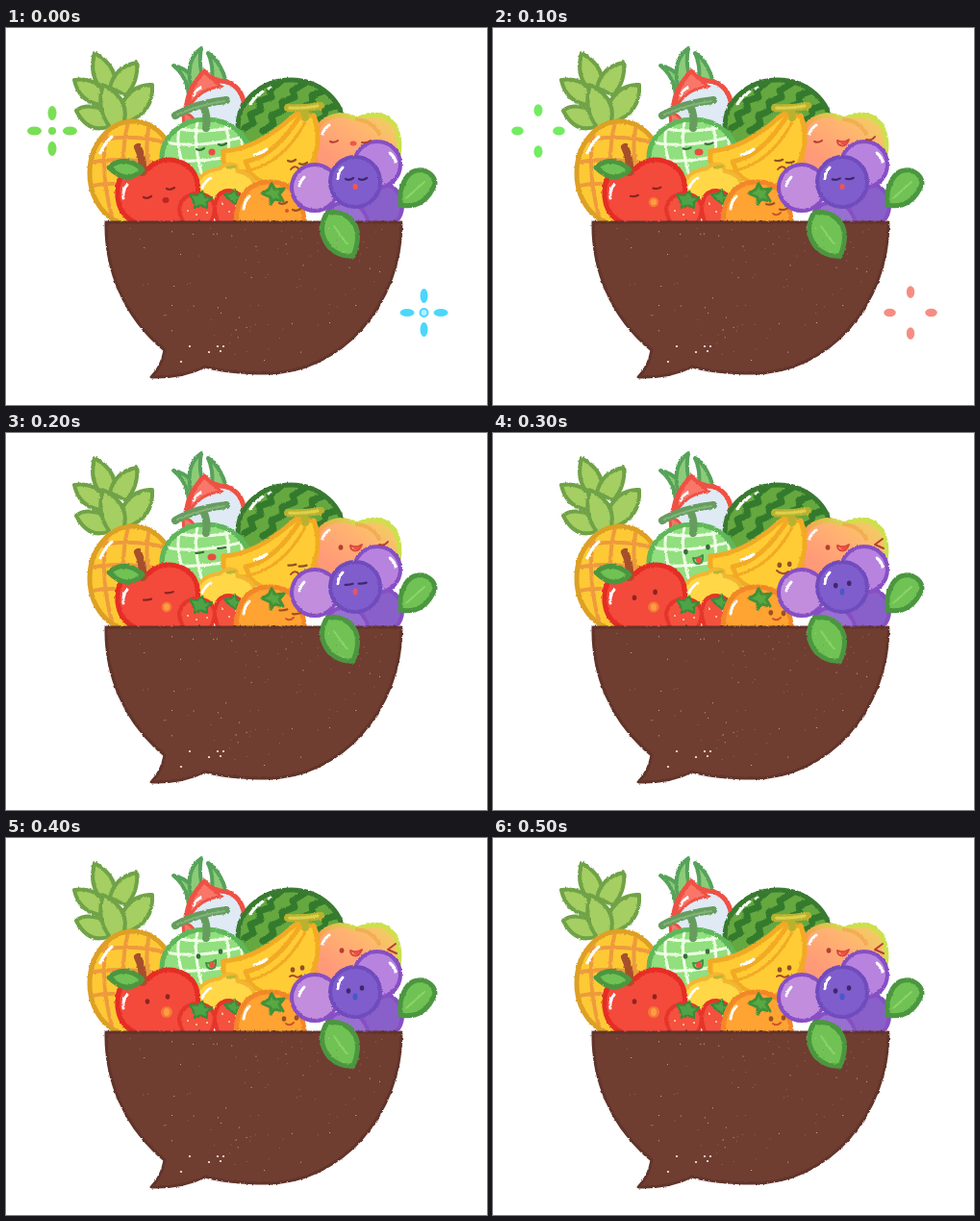
An HTML page that plays this animation: 500 px wide and 392 px high, repeating every 0.6 s.

```html
<!DOCTYPE html>
<html>
<head>
<meta charset="utf-8">
<style>
html, body { margin: 0; width: 100%; height: 100%; overflow: hidden; background: #fff }
svg { display: block; width: 500px; height: 392px }
path, ellipse, circle { stroke-linecap: round; stroke-linejoin: round }
.line { fill: none }
.shine { fill: none; stroke: #fff; stroke-width: 3 }
.crown { fill: #a5cf62; stroke: #70a247; stroke-width: 4 }
.leaf { fill: #70c254; stroke: #4c9640; stroke-width: 5 }
.berry { fill: #f4513f; stroke: #e5352b; stroke-width: 4 }
</style>
</head>
<body>
<svg viewBox="0 0 500 392">
<defs>
  <filter id="rough" x="0" y="0" width="500" height="392" filterUnits="userSpaceOnUse" color-interpolation-filters="sRGB">
    <feTurbulence type="fractalNoise" baseFrequency=".35" numOctaves="2" seed="4"/>
    <feDisplacementMap in="SourceGraphic" scale="2.5" xChannelSelector="R" yChannelSelector="G"/>
  </filter>
  <linearGradient id="skin" x1="0" y1="1" x2="1" y2="0">
    <stop offset=".25" stop-color="#ff9a78"/><stop offset=".65" stop-color="#ffb570"/><stop offset="1" stop-color="#e9d95a"/>
  </linearGradient>
  <linearGradient id="rim" x1="0" y1=".6" x2="1" y2="0">
    <stop offset=".2" stop-color="#ff9850"/><stop offset=".65" stop-color="#cde04c"/>
  </linearGradient>
  <clipPath id="pine"><ellipse cx="132" cy="151" rx="43" ry="52"/></clipPath>
  <clipPath id="water"><ellipse cx="296" cy="103" rx="53" ry="47"/></clipPath>
  <clipPath id="net"><ellipse cx="208" cy="135" rx="43" ry="38"/></clipPath>
</defs>
<g filter="url(#rough)">
  <!-- pineapple -->
  <g class="crown">
    <path d="M92 26Q87 45 95 58L112 66Q119 41 92 26Z"/>
    <path d="M136 36Q113 40 108 62L125 70Q138 55 136 36Z"/>
    <path d="M71 54Q76 77 99 80L105 69Q93 51 71 54Z"/>
    <path d="M152 59Q129 58 118 84L125 98Q154 88 152 59Z"/>
    <path d="M73 86Q84 76 108 88L108 102Q86 111 73 86Z"/>
    <path d="M101 59Q93 83 108 103H121Q132 75 101 59Z"/>
  </g>
  <ellipse cx="132" cy="151" rx="45" ry="54" fill="#fdc935" stroke="#dda025" stroke-width="5"/>
  <path clip-path="url(#pine)" class="line" stroke="#ee9a3d" stroke-width="4" d="M92 118Q130 108 174 121M86 140Q125 132 178 145M86 165Q110 158 150 167M106 102Q96 145 111 200M127 98Q116 140 129 200M149 100Q142 130 154 165"/>
  <path class="shine" d="M98 130Q103 119 110 113"/>
  <!-- dragon fruit -->
  <g fill="#8ccc79" stroke="#57a25a" stroke-width="4">
    <path d="M174 39Q197 44 202 70L190 74Q190 52 174 39Z"/>
    <path d="M203 21Q185 34 193 64L208 61Q199 40 203 21Z"/>
    <path d="M210 26Q222 33 229 56L214 55Q216 39 210 26Z"/>
  </g>
  <path d="M206 45Q213 55 230 56Q248 63 248 86Q247 116 215 116Q184 113 187 82Q190 62 206 45Z" fill="#dfeaf5" stroke="#ef5144" stroke-width="5"/>
  <path d="M206 46Q216 54 224 61Q203 62 191 81Q190 62 206 46ZM184 89Q191 87 198 99L185 103Z" fill="#f87769" stroke="#ef5144" stroke-width="3"/>
  <path class="shine" d="M195 70Q198 64 202 62"/>
  <!-- watermelon -->
  <ellipse cx="296" cy="103" rx="55" ry="49" fill="#65a840" stroke="#397a31" stroke-width="5"/>
  <path clip-path="url(#water)" class="line" stroke="#347a2d" stroke-width="7" d="M286 55l-12 10 2 7-13 4 2 9-11 5 3 9-9 5M311 57l-13 8 2 7-13 5 1 9-12 5 2 9-11 7M329 66l-11 4 1 8-12 5 1 8-12 5 1 9-8 8M343 81l-11 3-1 9-11 5"/>
  <path class="shine" d="M254 79Q259 71 267 66M273 63L275 62"/>
  <!-- melon -->
  <ellipse cx="208" cy="135" rx="46" ry="40" fill="#91df7e" stroke="#5fb75a" stroke-width="5"/>
  <path clip-path="url(#net)" class="line" stroke="#efffe5" stroke-width="3" d="M166 119Q200 126 252 112M164 136Q205 143 252 128M174 104Q210 111 245 101M181 100Q174 125 190 155M199 97Q194 122 205 157M227 97Q235 118 230 157M241 104Q248 120 245 148"/>
  <path class="line" stroke="#669d5f" stroke-width="8" d="M176 91Q198 78 229 75M205 81Q210 91 208 104"/>
  <path class="line" stroke="#84b478" stroke-width="2" d="M178 90Q200 80 227 76"/>
  <!-- peach -->
  <path d="M327 153Q311 111 331 96Q348 86 365 95Q383 86 397 94L404 101Q416 126 399 154Z" fill="url(#skin)" stroke="url(#rim)" stroke-width="5"/>
  <path class="line" stroke="#f3ad54" stroke-width="4" d="M365 95Q381 97 388 110"/>
  <path class="shine" d="M329 110Q331 104 336 101"/>
  <!-- bananas -->
  <g fill="#ffcc35" stroke="#f2aa24" stroke-width="5">
    <path d="M226 128Q260 126 296 94L306 86L318 94Q306 145 249 150Q231 149 226 139Z"/>
    <path d="M249 139Q280 133 306 91L320 91Q329 118 318 140Q308 160 293 164Q265 164 254 151Z"/>
    <path class="line" d="M253 148Q289 139 311 98" stroke-width="3"/>
  </g>
  <path class="line" stroke="#b9b22f" stroke-width="8" d="M293 83Q309 84 327 81M310 84L311 93"/>
  <path class="line" stroke="#dfd04b" stroke-width="3" d="M295 83Q309 84 324 81"/>
  <path class="shine" stroke-width="2" d="M258 132Q266 130 271 126"/>
  <!-- lemon -->
  <path d="M195 175Q195 150 222 146Q231 139 239 143L241 149Q260 152 261 174Q250 200 224 198Q202 196 195 175Z" fill="#ffd747" stroke="#f1b633" stroke-width="4"/>
  <path class="line" stroke="#bcb532" stroke-width="3" d="M231 145L238 144"/>
  <path class="shine" d="M204 166Q207 159 213 156"/>
  <!-- apple -->
  <path d="M146 148Q159 134 177 138Q204 145 199 180Q194 207 159 207Q119 206 116 176Q114 150 134 144Q142 143 146 148Z" fill="#f34a3c" stroke="#e52d25" stroke-width="5"/>
  <path class="line" stroke="#a64f2c" stroke-width="8" d="M137 124Q143 136 142 150"/>
  <path class="leaf" d="M107 145Q123 131 142 147Q126 164 107 145Z"/>
  <path class="shine" d="M122 177Q121 168 126 163"/>
  <!-- strawberries -->
  <path class="berry" d="M217 190Q217 169 232 169Q246 170 246 185L239 209H222Z"/>
  <path class="berry" d="M180 188Q183 173 198 172Q216 173 217 188Q216 202 206 209H190Q181 200 180 188Z"/>
  <path d="M195 180l-4-7 8 1 5-4 3 6 7 1-5 4v6l-7-3-6 3ZM233 179l-6-6 7-1 4-4 2 6 6 1-6 4v5Z" fill="#4da345" stroke="#398b39" stroke-width="2"/>
  <path class="line" stroke="#ffd0a4" stroke-width="2" d="M189 190h.1M198 194h.1M209 192h.1M225 183h.1M232 191h.1M239 185h.1"/>
  <!-- orange -->
  <path d="M239 211Q237 163 272 160Q309 158 311 211Z" fill="#ffa332" stroke="#f28728" stroke-width="5"/>
  <path d="M275 176l-9-4 7-4 3-6 4 6 9-1-5 6 4 7-8-2-5 5Z" fill="#58a943" stroke="#429038" stroke-width="3"/>
  <path class="shine" d="M247 188Q248 180 253 175"/>
  <!-- grapes -->
  <g stroke="#874fc4" stroke-width="4">
    <circle cx="388" cy="185" r="24" fill="#8960c9"/>
    <circle cx="386" cy="142" r="24" fill="#b883df"/>
    <circle cx="321" cy="166" r="24" fill="#c28ddd"/>
    <circle cx="353" cy="204" r="23" fill="#9870d1"/>
    <circle cx="363" cy="160" r="26" fill="#805dcc" stroke="#704bbd"/>
  </g>
  <path class="shine" d="M345 157Q345 150 350 145M305 164Q306 159 310 155M399 130Q404 134 405 139"/>
  <path class="leaf" d="M410 171Q416 145 434 148Q446 152 446 162Q435 189 410 184Z"/>
  <path class="line" stroke="#8bd469" stroke-width="2" d="M416 177L435 160"/>
  <!-- bowl -->
  <path d="M104 202H411C411 288 348 359 270 359C245 359 224 357 207 352Q184 364 151 363Q162 352 165 335C122 300 103 250 104 202Z" fill="#703d31" stroke="#61342a" stroke-width="3"/>
  <path class="leaf" d="M334 192Q322 210 336 228Q348 239 361 237Q373 207 353 195Q345 190 334 192Z"/>
  <path class="line" stroke="#8bd469" stroke-width="2" d="M341 206L354 224"/>
</g>
<g id="specks"></g>
<g id="live"></g>
</svg>
<script>
const byId = id => document.getElementById(id);
const oval = (x, y, rx, ry, fill) => `<ellipse cx="${x}" cy="${y}" rx="${rx}" ry="${ry}" fill="${fill}"/>`;
const stroke = (d, color, w = 2) => `<path class="line" d="${d}" stroke="${color}" stroke-width="${w}"/>`;
const mix = (a, b, k) => a + (b - a) * k;

// Paint specks on the bowl
let seed = 17;
const rand = () => (seed = seed * 16807 % 2147483647) / 2147483647;
let specks = '';
for (let i = 0; i < 100; i++) {
  const a = rand() * Math.PI, r = Math.sqrt(rand());
  specks += oval(258 + 140 * r * Math.cos(a), 207 + 142 * r * Math.sin(a), .55, .5, i % 3 ? '#9a7065' : '#d9c2b8');
}
for (const [x, y] of [[220, 331], [226, 331], [223, 336], [211, 337], [191, 331], [182, 347]])
  specks += oval(x, y, 1.2, 1.1, '#f6e6da');
byId('specks').innerHTML = specks;

// Eyes: asleep x, y, awake x, y
const faces = [
  { ink: '#8c2520', eyes: [[147, 176, 147, 170], [171, 167, 168, 165]] },
  { ink: '#386f39', eyes: [[202, 126, 200, 123], [225, 121, 223, 118]] },
  { ink: '#925023', eyes: [[297, 138, 298, 137], [309, 141, 308, 135]] },
  { ink: '#9b5122', eyes: [[288, 182, 289, 188], [302, 189, 302, 187]] },
  { ink: '#3d286e', eyes: [[357, 157, 356, 159], [371, 157, 370, 156]] },
];
const wake = [0, .2, .4, .8, 1, 1];

function eye([x0, y0, x1, y1], ink, k) {
  const x = mix(x0, x1, k), y = mix(y0, y1, k);
  return k < .5 ? stroke(`M${x - 4} ${y}q4 ${2 - k * 4} 8 -1`, ink, 2.2) : oval(x, y, 2.3, 2.8, ink);
}

function mouths(n, k) {
  const open = n > 2;
  let s = n ? oval(167, 181, 5 + k, 5 + k, '#f47934') + oval(167, 181, 3, 3 + k, '#ff9b45')
            : oval(166, 179, 3.5, 3, '#b92722');
  s += open ? stroke('M208 130q6 1 10-3q1 9-5 9q-4 0-5-6', '#409344') + oval(214, 132, 3, 3, '#ef5242')
            : oval(214, 129, n ? 4.5 : 3.5, 3.5, '#e94d40');
  s += stroke(n < 3 ? 'M296 147q4-5 8-1' : n == 3 ? 'M295 143q6 6 12 1' : 'M295 144q3-2 6 0t6-1', '#a8482d');
  s += n ? stroke('M291 193q4 3 8-1', '#cf542b') : oval(292, 190, 2, 2, '#d9562c');
  s += oval(363, 165, 2.5, n < 2 ? 3 : 3.5, ['#f05a4c', '#ed574b', '#e55666', '#4559ca', '#435acb', '#435acb'][n]);
  return s;
}

function peach(n) {
  const ink = '#b34032';
  if (!n) return stroke('M337 118q4 2 8-1M370 119q5 1 9-2', ink) + oval(361, 120, 3.5, 2.5, '#ed574a');
  const left = n < 2 ? stroke('M334 118q4 2 8-1', ink) : oval(n < 4 ? 348 : 349, n < 4 ? 119 : 117, 2.4, 2.8, ink);
  const wink = n < 3 ? stroke('M388 116q5 2 9-3', ink) : stroke('M405 110l-8 6 9 4', ink);
  return left + wink + stroke('M358 117q7 3 12-1q-3 8-9 6q-3-1-3-5', '#d94840') + oval(364, 119, 3, 2, '#ee4d44');
}

function sparkle(x, y, gap, rx, ry, color) {
  return oval(x, y - gap, rx, ry, color) + oval(x, y + gap, rx, ry, color) +
    oval(x - gap, y, ry, rx, color) + oval(x + gap, y, ry, rx, color);
}

function sparkles(n) {
  if (n == 0) return sparkle(48, 107, 18.5, 4.5, 7.5, '#79df55') + oval(48, 107, 4, 4, '#79df55') +
    sparkle(434.5, 296, 17.5, 4, 7.5, '#4bd7fa') +
    '<circle cx="434.5" cy="296" r="4" fill="#b5efff" stroke="#4bd7fa" stroke-width="2"/>';
  if (n == 1) return sparkle(47, 107, 21.5, 4.5, 6.3, '#72ec62') + sparkle(434, 296, 21.5, 4.2, 6.3, '#f78d82');
  return '';
}

let shown = -1;
function tick(now) {
  const n = Math.floor(now / 100) % 6;
  if (n != shown) {
    shown = n;
    const k = wake[n];
    byId('live').innerHTML = sparkles(n) + mouths(n, k) + peach(n) +
      faces.map(f => f.eyes.map(e => eye(e, f.ink, k)).join('')).join('');
  }
  requestAnimationFrame(tick);
}
tick(0);
</script>
</body>
</html>
```
